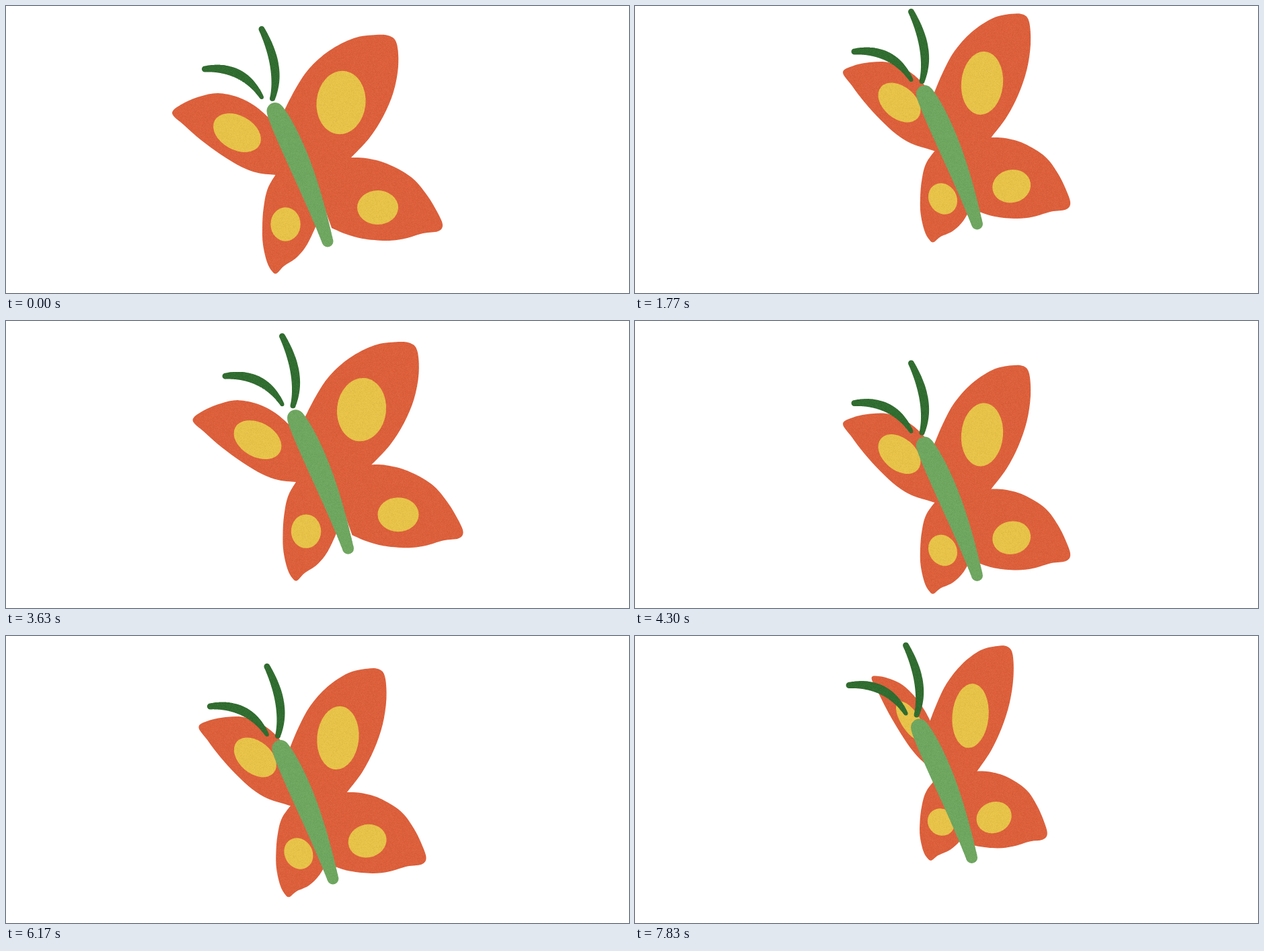
An HTML page with a canvas that plays this animation: 926x428 px, repeating every 7.91 s.

```html
<!DOCTYPE html>
<html lang="en">
<head>
<meta charset="utf-8">
<title>Butterfly</title>
<style>
html, body { margin: 0; width: 100%; height: 100%; overflow: hidden; background: #fff; }
canvas { display: block; }
</style>
</head>
<body>
<canvas id="stage" width="926" height="428"></canvas>
<script>
const ctx = document.getElementById('stage').getContext('2d');
const W = 926, H = 428, LOOP = 7910;
const ORANGE = '#de5f3a', YELLOW = '#e9c448', GREEN = '#6ea75f', DARK = '#2f6c2e';

const points = text => text.split(' ').map(s => s.split(',').map(Number));
const mix = (a, b, t) => a + (b - a) * t;
const smooth = t => t * t * (3 - 2 * t);

// Smooth open curve through the points, closed by a corner at the root.
function outline(root, text) {
  const p = points(text), path = new Path2D();
  const at = i => p[Math.max(0, Math.min(p.length - 1, i))];
  path.moveTo(...root);
  path.lineTo(...p[0]);
  for (let i = 0; i < p.length - 1; i++) {
    const [a, b, c, d] = [at(i - 1), at(i), at(i + 1), at(i + 2)];
    path.bezierCurveTo(
      b[0] + (c[0] - a[0]) / 6, b[1] + (c[1] - a[1]) / 6,
      c[0] - (d[0] - b[0]) / 6, c[1] - (d[1] - b[1]) / 6, c[0], c[1]);
  }
  path.closePath();
  return path;
}

function ellipse(x, y, rx, ry, deg) {
  const path = new Path2D();
  path.ellipse(x, y, rx, ry, deg * Math.PI / 180, 0, 2 * Math.PI);
  return path;
}

// Matrix that carries the unit triangle onto three anchors.
function frame(text) {
  const [a, b, c] = points(text);
  return new DOMMatrix([b[0] - a[0], b[1] - a[1], c[0] - a[0], c[1] - a[1], ...a]);
}

// A wing is drawn once, open; its anchors in the open, half and shut pose fold it.
function wing(shape, spot, ...anchors) {
  const unfold = frame(anchors[0]).inverse();
  return anchors.map(text => {
    const fold = frame(text).multiply(unfold);
    return [shape, spot].map(path => {
      const out = new Path2D();
      out.addPath(path, fold);
      return out;
    });
  });
}

const wings = [
  wing(outline([450, 270], '414,155 430,124 450,94 480,67 517,48 550,43 571,45 581,57 583,90 576,128 561,164 540,197 513,226'),
    ellipse(498, 144, 36.5, 47.3, 6),
    '498,144 577,48 513,226', '485.5,141 552,41.5 499,222', '476,139.5 536,39.5 486,222'),
  wing(outline([450, 235], '513,226 535,227 566,235 602,255 625,281 642,309 649,327 642,336 620,339 592,347 565,350 530,347 505,340 484,331'),
    ellipse(552.5, 300.5, 30.5, 25.5, 0),
    '513,226 649,328 565,350', '499,222 616.5,322 536.5,343', '486,222 590,317 516,337'),
  wing(outline([432, 255], '391,167 370,149 345,136 315,130 288,135 262,146 247,160 265,178 290,200 320,222 350,240 375,249 401,252'),
    ellipse(343.5, 189, 38, 25.5, 29),
    '343.5,189 247,160 375,249', '362.5,170 278.5,124.5 380,231', '387,147.5 329,83 400,203'),
  wing(outline([440, 250], '410,238 390,270 383,300 381,330 382,356 388,382 395,395 402,399 413,388 432,375 448,355 463,323'),
    ellipse(415.5, 325.5, 22.2, 25.2, 0),
    '415.5,325.5 400,399 390,270', '427,313.5 411,378 403,259', '432.5,298 416,355 411,251')
];

// Tapered strand: discs along a quadratic curve, from radius r0 to r1 with a bulge.
function strand([a, c, b], r0, r1, bulge, skew) {
  const path = new Path2D(), steps = 160;
  for (let i = 0; i <= steps; i++) {
    const t = i / steps;
    const [x, y] = [0, 1].map(k => mix(mix(a[k], c[k], t), mix(c[k], b[k], t), t));
    const r = mix(r0, r1, t) + bulge * Math.sin(Math.PI * t ** skew);
    path.moveTo(x + r, y);
    path.arc(x, y, r, 0, 2 * Math.PI);
  }
  return path;
}

const body = strand(points('400,156.5 445,244 478,351'), 12.5, 8.5, 5.5, 0.7);
const feelers = [
  strand(points('380,34.5 410,93 396,138'), 4.5, 4, 2.3, 1),
  strand(points('295.5,94 352,88 380,136'), 4.5, 3, 3, 1)
];

// Faint paper grain.
const grain = (() => {
  const size = 192, tile = document.createElement('canvas');
  tile.width = tile.height = size;
  const g = tile.getContext('2d'), img = g.createImageData(size, size);
  let seed = 7;
  for (let i = 0; i < img.data.length; i += 4) {
    seed = (seed * 16807) % 2147483647;
    const v = seed / 2147483647 - 0.5;
    img.data[i] = img.data[i + 1] = img.data[i + 2] = v > 0 ? 255 : 0;
    img.data[i + 3] = Math.abs(v) * 22;
  }
  g.putImageData(img, 0, 0);
  return ctx.createPattern(tile, 'repeat');
})();

// Flight round a triangle: out and down, straight up, back home; three eased steps a side.
function place(n) {
  const right = 30.5, low = 28.5, high = -26;
  const side = Math.floor(n / 3) % 3, s = smooth(n % 3 / 3);
  if (side === 1) return [right, mix(low, high, s)];
  const u = side ? 1 - s : s, end = side ? high : low;
  return [right * u, end * u + Math.sign(end) * 25 * u * (1 - u) ** 2];
}

function fill(path, color) {
  ctx.fillStyle = color;
  ctx.fill(path);
}

function draw(step) {
  const k = step % 36;
  const n = k < 5 ? k : k - 1; // one stop is held for two steps
  const pose = 2 - Math.abs(n % 4 - 2); // open, half, shut, half

  ctx.globalCompositeOperation = 'source-over';
  ctx.clearRect(0, 0, W, H);
  ctx.save();
  ctx.translate(...place(n));
  wings.forEach(w => fill(w[pose][0], ORANGE));
  wings.forEach(w => fill(w[pose][1], YELLOW));
  fill(body, GREEN);
  feelers.forEach(f => fill(f, DARK));
  ctx.restore();

  ctx.globalCompositeOperation = 'source-atop';
  ctx.fillStyle = grain;
  ctx.fillRect(0, 0, W, H);
}

// Ten steps take 33 ticks of a 30 Hz clock; times are rounded to 10 ms.
function stepAt(ms) {
  const ticks = Math.floor((ms + 3.4) * 0.03);
  return Math.floor(ticks * 10 / 33);
}

const start = performance.now();
function tick() {
  draw(stepAt((performance.now() - start) % LOOP));
  requestAnimationFrame(tick);
}
tick();
</script>
</body>
</html>
```
